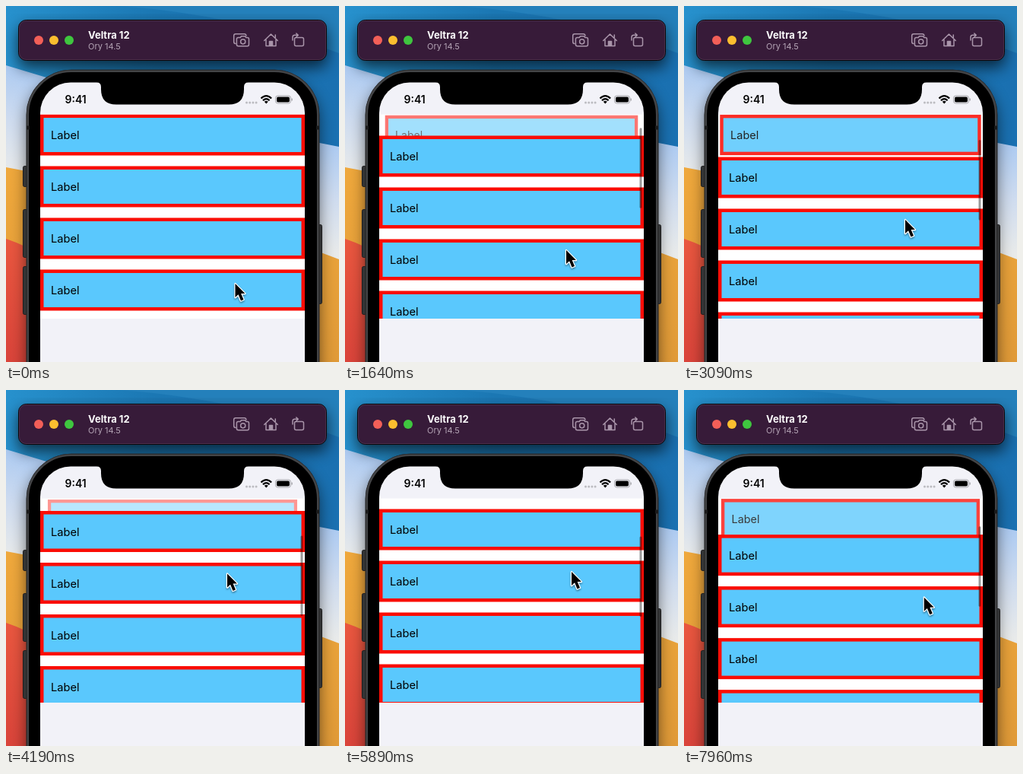
An HTML page that plays this animation: 438x468 px, repeating every 7990 ms.

```html
<!DOCTYPE html>
<html lang="en">
<head>
<meta charset="utf-8">
<title>Stacking list</title>
<style>
html, body { margin: 0; width: 100%; height: 100%; overflow: hidden; }
svg { display: block; width: 438px; height: 468px; font-family: Inter, Roboto, sans-serif; }
</style>
</head>
<body>
<svg viewBox="0 0 438 468">
  <defs>
    <linearGradient id="sky"><stop stop-color="#2791cd"/><stop offset=".45" stop-color="#1b77b3"/><stop offset="1" stop-color="#1a70b1"/></linearGradient>
    <linearGradient id="pale" gradientUnits="userSpaceOnUse" x1="0" y1="80" x2="-32" y2="212"><stop stop-color="#aecbf1"/><stop offset=".5" stop-color="#cfdcef"/><stop offset="1" stop-color="#e8eaea"/></linearGradient>
    <linearGradient id="gold" x2="0" y2="1"><stop stop-color="#efa83c"/><stop offset="1" stop-color="#e09a38"/></linearGradient>
    <linearGradient id="coral" x2="0" y2="1"><stop stop-color="#e9573f"/><stop offset="1" stop-color="#d9443a"/></linearGradient>
    <filter id="blur" x="-20%" y="-30%" width="140%" height="170%"><feGaussianBlur stdDeviation="10"/></filter>
    <filter id="soft" x="-50%" y="-50%" width="200%" height="200%"><feDropShadow dx="0" dy="1.5" stdDeviation="1.3" flood-opacity=".45"/></filter>
    <clipPath id="list"><rect x="45" y="142.500" width="348" height="268.500"/></clipPath>
  </defs>

  <!-- wallpaper -->
  <rect width="438" height="468" fill="url(#sky)"/>
  <path d="M150 0Q310 12 438 62V0Z" fill="#2480bb"/>
  <path d="M0 78Q200 140 438 185V468H0Z" fill="url(#pale)"/>
  <path d="M0 212Q240 255 438 333V468H0Z" fill="url(#gold)"/>
  <path d="M0 306Q100 340 200 468H0Z" fill="url(#coral)"/>
  <rect x="27" y="94" width="385" height="440" rx="58" opacity=".55" filter="url(#blur)"/>
  <rect x="16" y="27" width="406" height="54" rx="10" opacity=".65" filter="url(#blur)"/>

  <!-- phone -->
  <g fill="#333435" stroke="#1d1d1e">
    <rect x="22.5" y="210.5" width="6" height="27" rx="2"/>
    <rect x="22.5" y="267.5" width="6" height="63" rx="2"/>
    <rect x="22.5" y="342.5" width="6" height="63" rx="2"/>
    <rect x="409.5" y="287.5" width="6" height="104" rx="2"/>
  </g>
  <rect x="27" y="84" width="385" height="450" rx="59" fill="#111" stroke="#29292a"/>
  <rect x="28.800" y="85.800" width="381.400" height="450" rx="57" fill="#000" stroke="#434446" stroke-width="2.500"/>
  <path d="M27 160h4M408 160h4" stroke="#1a1a1a" stroke-width="5"/>
  <rect x="45" y="100.500" width="348" height="450" rx="40" fill="#f2f2f8"/>
  <path d="M119 100Q125 100.500 125 106.500V109.500Q125 129.500 145 129.500H293Q313 129.500 313 109.500V106.500Q313 100.500 319 100Z"/>

  <!-- status bar -->
  <text x="77.500" y="128" font-size="14" font-weight="600">9:41</text>
  <path d="M316.500 127h15" stroke="#bcbcc1" stroke-width="3" stroke-linecap="round" stroke-dasharray="0 4.200"/>
  <g fill="none" stroke="#000" stroke-width="2.300">
    <path d="M335.500 121.500Q342.300 114.800 349.100 121.500M338 124.200Q342.300 120 346.600 124.200"/>
    <path d="M339.800 125.700Q342.300 123.600 344.800 125.700L342.300 128.500Z" fill="#000" stroke="none"/>
    <rect x="354.500" y="118" width="20" height="10" rx="3" stroke="#a5a5aa" stroke-width="1"/>
    <rect x="356" y="119.500" width="17" height="7" rx="1.800" fill="#000" stroke="none"/>
    <path d="M376.200 121.500v3" stroke="#a5a5aa" stroke-width="1.300"/>
  </g>

  <!-- list -->
  <g clip-path="url(#list)">
    <rect x="45" y="142" width="348" height="269" fill="#fff"/>
    <g id="cells"></g>
    <rect id="bar" x="387.500" width="3" height="105.500" rx="1.500" opacity="0"/>
  </g>

  <!-- window bar -->
  <rect x="16.500" y="18.500" width="405" height="53" rx="10" fill="#371b39" stroke="#0a0609"/>
  <rect x="17.500" y="19.500" width="403" height="51" rx="9" fill="none" stroke="#5a405b" stroke-opacity=".55"/>
  <circle cx="43" cy="45" r="6" fill="#f25f58"/>
  <circle cx="63" cy="45" r="6" fill="#fbbe2f"/>
  <circle cx="83" cy="45" r="6" fill="#3fc63f"/>
  <text x="108" y="43" font-size="13" font-weight="700" fill="#fff">Veltra 12</text>
  <text x="108" y="57" font-size="11" fill="#b5a5b6">Ory 14.5</text>
  <g fill="none" stroke="#a995aa" stroke-width="1.500" stroke-linejoin="round" stroke-linecap="round">
    <path d="M302 49.500Q299.700 49.500 299.700 47V39Q299.700 36.700 302 36.700H313.500Q315.700 36.700 316 39"/>
    <path d="M305.500 41.500H308.200L309.500 39.700H314.500L315.800 41.500H317.500Q319.500 41.500 319.500 43.500V50.500Q319.500 52.700 317.500 52.700H305.500Q303.400 52.700 303.400 50.500V43.500Q303.400 41.500 305.500 41.500Z"/>
    <circle cx="311.700" cy="46.800" r="3.100"/>
    <path d="M339.700 45.500L348.500 37L357.300 45.500M342 44V52.500H355V44M354.300 41.500V38"/>
    <path d="M346.500 52V46.500H350.500V52Z" fill="#a995aa"/>
    <rect x="379.500" y="41.500" width="12" height="11" rx="2"/>
    <path d="M377 45V41Q377 38.300 380 38.300H384M381.800 36L384.300 38.300L381.800 40.700"/>
  </g>

  <path id="cursor" d="M0 0V18L4.100 14.300L7.500 22.500L11 21L7.600 13.100H12.900Z" stroke="#fff" stroke-width="2.400" paint-order="stroke" stroke-linejoin="round" filter="url(#soft)"/>
</svg>

<script>
const LOOP = 7990, TOP = 142.5, PITCH = 68, HEIGHT = 54, VIEW = 268, COUNT = 10;
const $ = id => document.getElementById(id);

// time, scroll offset, pointer x
const drag = [
  [90, 0, 301], [400, 7, 293], [990, 23, 290.500], [2290, 57, 290.500],
  [3090, 80, 290.500], [4190, 119.500, 290.500], [4740, 132, 292], [4990, 132, 292],
  [5490, 126.500, 296], [5690, 126.500, 296], [5890, 122, 297.500],
  [6190, 117, 300], [6340, 117, 300], [7960, 88, 315.500]
];

$('cells').innerHTML = `<g>
  <rect x="47.25" y="2.25" width="343.500" height="${HEIGHT - 4.5}" fill="#5ac8fd" stroke="#fb0d05" stroke-width="4.500"/>
  <text x="59" y="32.800" font-size="14.700">Label</text></g>`.repeat(COUNT);
const cells = [...$('cells').children];

function sample(t) {
  if (t <= drag[0][0]) return drag[0].slice(1);
  const i = drag.findIndex(k => k[0] >= t);
  if (i < 0) return drag.at(-1).slice(1);
  const a = drag[i - 1], b = drag[i], p = (t - a[0]) / (b[0] - a[0]);
  return [1, 2].map(j => a[j] + (b[j] - a[j]) * p);
}

function draw(t) {
  const [offset, x] = sample(t);
  cells.forEach((cell, i) => {
    const y = i * PITCH - offset;
    const past = Math.max(0, -y);
    const scale = 1 - past / 900;
    const shown = past < HEIGHT - .5 && y < VIEW;
    // cells past the top edge stay pinned, shrink and fade
    cell.setAttribute('opacity', shown ? 1 - past / 90 : 0);
    cell.setAttribute('transform',
      `translate(${219 * (1 - scale)} ${TOP + Math.max(0, y) + HEIGHT / 2 * (1 - scale)}) scale(${scale})`);
  });
  $('bar').setAttribute('y', TOP + 2 + offset * VIEW / (COUNT * PITCH));
  $('bar').setAttribute('opacity', Math.min(1, Math.max(0, (t - 90) / 200)) * .4);
  $('cursor').setAttribute('transform', `translate(${x + .5} ${365 - offset - 4 * Math.min(1, offset / 7)})`);
}

function tick() {
  const t = performance.now() % LOOP;
  draw(Math.floor((t - 40) / 50) * 50 + 40);
  requestAnimationFrame(tick);
}
tick();
</script>
</body>
</html>
```
